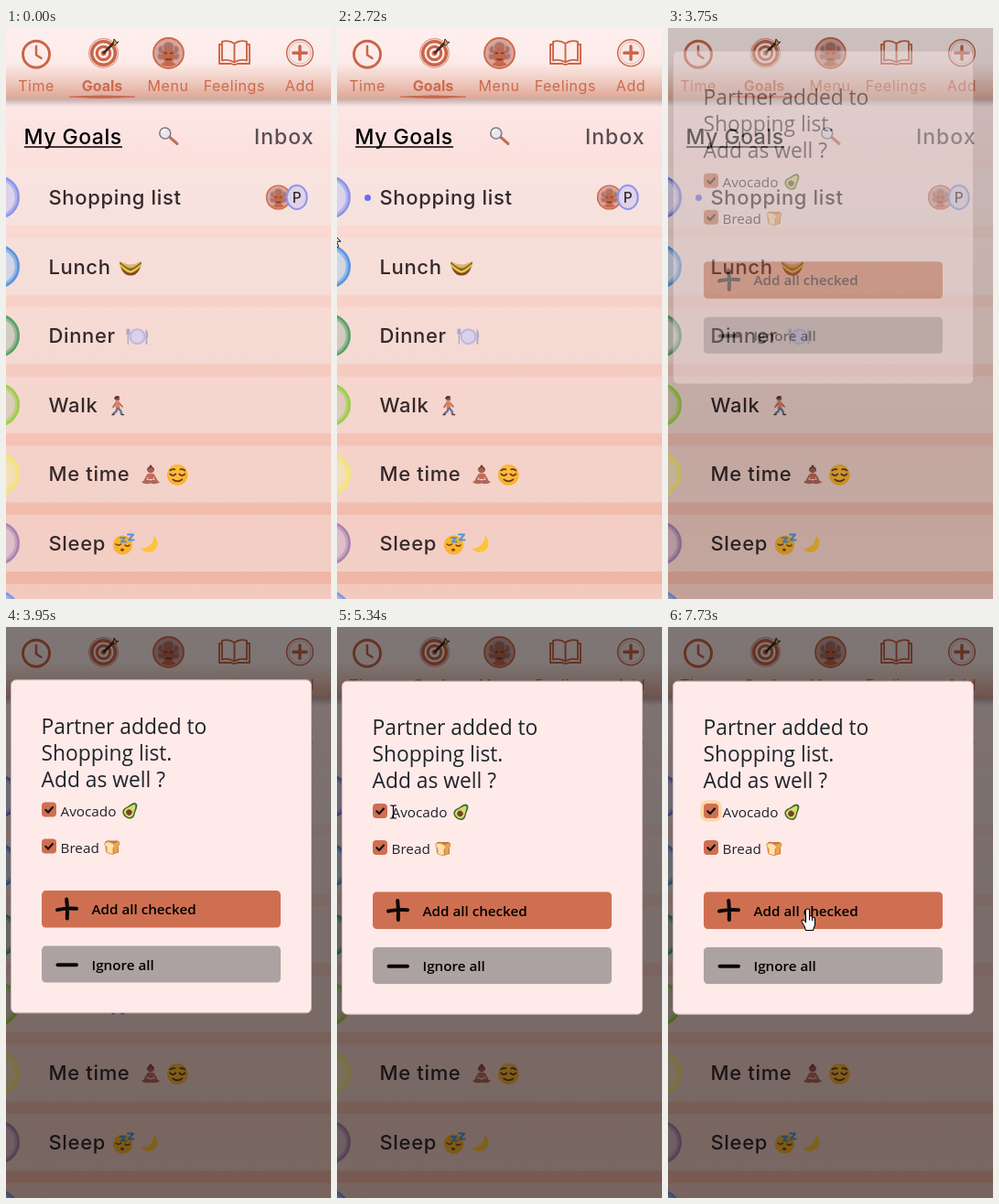
Recreate the animation shown at these times as an HTML page. Size 355x624 px, loop 8000 ms.

```html
<!DOCTYPE html>
<html lang="en">
<head>
<meta charset="utf-8">
<title>My Goals</title>
<style>
html, body { margin: 0; width: 100%; height: 100%; overflow: hidden; background: #fde8e7; }
svg { display: block; width: 100vw; height: 100vh; }
text { white-space: pre; }
.ui { font: 500 22px Inter, sans-serif; letter-spacing: .65px; fill: #33292b; }
.tab { font: 400 16px Inter, sans-serif; letter-spacing: .55px; fill: #cb6a4d; text-anchor: middle; }
.on { font-weight: 700; letter-spacing: 0; }
.head { font-size: 23px; letter-spacing: .5px; }
.inbox { letter-spacing: 1px; fill: #5a4f55; }
.title { font: 400 22.8px "Open Sans", "Noto Sans", sans-serif; fill: #212529; }
.item { font: 400 15.3px "Open Sans", "Noto Sans", sans-serif; fill: #212529; }
.btn { font: 600 15.2px "Open Sans", "Noto Sans", sans-serif; fill: #000; }
.line { fill: none; stroke-linecap: round; stroke-linejoin: round; }
</style>
</head>
<body>
<svg viewBox="0 0 355 624" xmlns="http://www.w3.org/2000/svg">
<defs>
  <linearGradient id="page" x2="0" y2="1">
    <stop offset=".13" stop-color="#fde7e6"/><stop offset=".36" stop-color="#f9d8d1"/>
    <stop offset=".72" stop-color="#f4c3b6"/><stop offset="1" stop-color="#f0b4a3"/>
  </linearGradient>
  <linearGradient id="bar" x2="0" y2="1">
    <stop offset="0" stop-color="#feefee"/><stop offset=".5" stop-color="#fcebe9"/>
    <stop offset=".76" stop-color="#eecabf"/><stop offset="1" stop-color="#dfa796"/>
  </linearGradient>
  <linearGradient id="shade" x2="0" y2="1">
    <stop stop-color="#6d5652" stop-opacity=".42"/><stop offset="1" stop-color="#6d5652" stop-opacity="0"/>
  </linearGradient>
  <linearGradient id="row" x2="0" y2="1">
    <stop stop-color="#f6ebea" stop-opacity=".36"/><stop offset="1" stop-color="#f2eae8" stop-opacity=".48"/>
  </linearGradient>

  <g id="face">
    <circle r="15.7" fill="#dfa493" stroke="#cb6a4d" stroke-width="1.8"/>
    <g fill="#b4715f" stroke="#b3a0b6" stroke-width="1.2">
      <circle cx="-7.5" cy="3" r="4"/><circle cx="7.5" cy="3" r="4"/>
      <circle cx="-6.5" cy="-3.5" r="4.5"/><circle cx="6.5" cy="-3.5" r="4.5"/><circle cy="-6" r="6"/>
    </g>
    <path d="M-8 12Q-4 8 0 9Q4 8 8 12Q0 16-8 12" fill="#c8674b"/>
    <ellipse cy="2.5" rx="6.6" ry="8" fill="#c0694c"/>
    <path class="line" d="M-4 0H-2M2 0H4M-2.5 6Q0 7.5 2.5 6" stroke="#70332a" stroke-width="1.4"/>
  </g>

  <g id="sandwich">
    <path d="M-12-6Q-5-1 0 0Q5-1 12-6Q11 4 5 8Q0 10-5 8Q-11 4-12-6" fill="#824b25"/>
    <path class="line" d="M-11-3Q-5 4 0 5Q5 4 11-3" stroke="#f7c341" stroke-width="2.4"/>
    <path class="line" d="M-11-4.5Q-5 1 0 2Q5 1 11-4.5" stroke="#657f33" stroke-width="1.8"/>
    <path d="M-12-7Q-5-3 0-3Q5-3 12-7Q6 0 0 1Q-6 0-12-7" fill="#e8b065"/>
  </g>
  <g id="plate">
    <circle r="9" fill="#c2b8dc"/><circle r="6.8" fill="#dad1ec"/>
    <path class="line" d="M-10.2-8V8M-11.4-8V-3H-9V-8" stroke="#b0a6c4" stroke-width="1.3"/>
    <path d="M9-8.5Q12-6 11.5 1H10.8V8.5H9Z" fill="#b0a6c4"/>
  </g>
  <g id="walker">
    <circle cx="-.5" cy="-8" r="2.7" fill="#9a5a43"/><path d="M-4-7.5Q-3-12 2-10L0-8Z" fill="#5a3127"/>
    <path class="line" d="M-2-3L-5 1.5M1.5-3L5 1" stroke="#a86349" stroke-width="1.6"/>
    <path d="M-2.6-5H1.8L2.5 2.5H-2.5Z" fill="#df805f"/>
    <path class="line" d="M-.5 3L-1.5 6L-4.5 8.5M1 3L3.5 6L4 9" stroke="#6c7288" stroke-width="2.3"/>
    <path class="line" d="M-6 9.7H-4M4.5 9.8H6.5" stroke="#473e44" stroke-width="1.5"/>
  </g>
  <g id="lotus">
    <path d="M-3.5-4Q-5-9 0-9Q5-9 3.5-4Z" fill="#6d3a33"/><circle cy="-9.3" r="1.5" fill="#6d3a33"/>
    <circle cy="-5" r="3" fill="#a9634c"/>
    <path class="line" d="M-3 0L-6 5M3 0L6 5" stroke="#b06b53" stroke-width="2"/>
    <path d="M-3.2-1.5H3.2L2.8 4.5H-2.8Z" fill="#c56b5d"/>
    <path d="M-10 8Q-6 3.5 0 6Q6 3.5 10 8Q5 11 0 9Q-5 11-10 8" fill="#b1675a"/>
  </g>
  <g id="calm">
    <circle r="11.3" fill="#fab32d"/><circle cx="-1" cy="-2" r="8.5" fill="#ffc445" opacity=".5"/>
    <path class="line" d="M-8-1Q-5 2.5-2-1M2-1Q5 2.5 8-1M-8-5Q-5-7-3-6M3-6Q5-7 8-5M-5 5Q0 9 5 5" stroke="#663a20" stroke-width="1.8"/>
  </g>
  <g id="asleep">
    <circle cx="-.5" cy="1" r="10.6" fill="#fab32d"/>
    <path class="line" d="M-8 0Q-5 2.5-2.5 0M2 1Q4.5 3.5 7 1" stroke="#6c3c22" stroke-width="1.4"/>
    <ellipse cx="-1" cy="6.3" rx="2" ry="1.5" fill="#7d4425"/>
    <path class="line" d="M-3-7H2L-2-2.5H3M5-10.5H11L6-4.5H11.5" stroke="#5295d4" stroke-width="2"/>
  </g>
  <path id="moon" d="M4-9A10 10 0 1 1-10 5A14 14 0 0 0 4-9" fill="#ffc338"/>
  <g id="avocado" transform="rotate(38)">
    <path d="M0-10C4-10 4-4 6 0C9 5 5 9 0 9C-5 9-9 5-6 0C-4-4-4-10 0-10" fill="#436b2b"/>
    <path d="M0-8C2-8 3-3 4.5 0C7 5 4 7.4 0 7.4C-4 7.4-7 5-4.5 0C-3-3-2-8 0-8" fill="#d5db73"/>
    <circle cy="2.5" r="3.2" fill="#784324"/>
  </g>
  <g id="bread">
    <path d="M-8-5Q-7-8-2-7L6-7Q10-5 7-1V6L0 8L-7 5Z" fill="#c47a36"/>
    <path d="M-8-5Q-4-7 1-4Q4-1 1 1V8L-6 6V0Q-9-2-8-5" fill="#ffe0b0" stroke="#dc9a52"/>
    <path d="M2-4L7-6L8-2L6 0V5L2 7Z" fill="#e9a351"/>
  </g>

  <path id="arrow" d="M0 0V15.5L3.6 12.2L6 18L8.7 16.8L6.3 11.2H11Z" fill="#fff" stroke="#000"/>
  <path id="beam" class="line" d="M-3-7H-1L0-6L1-7H3M0-6V6M-3 7H-1L0 6L1 7H3" stroke="#000" stroke-width="1.2"/>
  <g id="hand">
    <path d="M-2 2Q-2 0 0 0Q2 0 2 2V8L3 7.5Q5 7.5 5 9.5Q8 8.6 8 11V18Q7 20 6 23.5H-2Q-3 19-6 15Q-7.5 12.5-5 12Q-4 12-2 14.5Z" fill="#fff" stroke="#000" stroke-width="1.1"/>
    <path d="M2 8V12.5M5 9.5V13" stroke="#000"/>
  </g>
  <g id="tick">
    <rect x="-8" y="-8" width="16" height="16" rx="4" fill="#cf6f51"/>
    <path class="line" d="M-3.7 .2L-1 3L4-2.5" stroke="#111" stroke-width="2.2"/>
  </g>
</defs>

<rect width="355" height="624" fill="url(#page)"/>
<g id="rows"></g>

<text class="ui head" x="19.5" y="127" style="fill:#000">My Goals</text>
<path d="M20 130H127" stroke="#000" stroke-width="1.6"/>
<text class="ui head inbox" x="336.5" y="127" text-anchor="end">Inbox</text>
<path class="line" d="M179 119.5L187 126.5" stroke="#bd705a" stroke-width="3"/>
<circle cx="173.8" cy="115" r="6" fill="#e6e6ec" stroke="#857b81" stroke-width="1.6"/>
<path class="line" d="M170 114Q171 111 174 111" stroke="#fff" stroke-width="1.4"/>

<use href="#face" transform="translate(297.5 185) scale(.82)"/>
<ellipse cx="317.7" cy="185" rx="11" ry="13" fill="#ded3e9" stroke="#8d95e9" stroke-width="2"/>
<text x="317.7" y="190.6" text-anchor="middle" style="font:500 15.5px Inter,sans-serif;fill:#33292b">P</text>
<circle id="dot" cx="33.5" cy="185.5" r="3.5" fill="#6b6cf2"/>

<rect y="77" width="355" height="9" fill="url(#shade)"/>
<rect width="355" height="77" fill="url(#bar)"/>
<g class="line" stroke="#cb6547">
  <circle cx="33" cy="28.8" r="14.5" stroke-width="2.9"/>
  <path d="M33 20V29.5L38.5 33" stroke-width="2.5"/>
  <circle cx="106.5" cy="27.5" r="15.8" stroke="#d99a87" stroke-width="1.2"/>
  <circle cx="106.5" cy="27.5" r="12.8" stroke-width="3.6"/>
  <circle cx="106.5" cy="27.5" r="7.2" stroke-width="3.2"/>
  <circle cx="106.5" cy="27.5" r="2.5" fill="#cb6547"/>
  <path d="M107 27L119 15" stroke="#352a26" stroke-width="2.6"/>
  <path d="M117 17L118 12L121 16L123 15L119 19Z" fill="#d6a84b" stroke="#352a26"/>
  <path d="M249.5 17V37.5M249.5 17Q243 12.5 236 15V35.5Q243 33.5 249.5 37.5Q256 33.5 263 35.5V15Q256 12.5 249.5 17M235.5 18H233V39H246Q249.5 41 253 39H266V18H263.5" stroke-width="1.9"/>
  <circle cx="321" cy="27.2" r="14.4" fill="#f8e6e6" stroke-width="1.4"/>
  <circle cx="321" cy="27.2" r="12" stroke="#e3b9b0" stroke-width="1"/>
  <path d="M321 20V34.4M313.8 27.2H328.2" stroke-width="3.4"/>
</g>
<use href="#face" transform="translate(177.5 27.5) scale(1.05)"/>
<g id="tabs"></g>
<path d="M69 75.2Q105 72.6 141 75.2Q105 78 69 75.2" fill="#cb6547" stroke="#cb6547" stroke-width=".8"/>

<rect id="veil" width="355" height="624"/>
<g id="dialog">
  <rect x="5.5" y="59.2" width="328" height="364" rx="5.5" fill="#ffeaea" stroke="#c9b4b3"/>
  <text class="title" x="38.5" y="118">Partner added to</text>
  <text class="title" x="38.5" y="147">Shopping list.</text>
  <text class="title" x="38.5" y="176">Add as well ?</text>
  <rect id="ring" x="37" y="191" width="20" height="20" rx="6" fill="#ffd7a8" stroke="#ffd7a8" stroke-width="3.5"/>
  <use href="#tick" x="47" y="201"/>
  <use href="#tick" x="47" y="241"/>
  <text class="item" x="59.5" y="208">Avocado</text>
  <text class="item" x="59.5" y="248">Bread</text>
  <use href="#avocado" x="0" y="0" transform="translate(136 202)"/>
  <use href="#bread" transform="translate(116 242)"/>
  <rect x="39" y="289.5" width="261" height="40.5" rx="4.5" fill="#cf6f51"/>
  <rect x="39" y="350" width="261" height="40" rx="4.5" fill="#aca2a1"/>
  <path class="line" d="M56 310.5Q66 308.5 77 309.2M66.2 299Q67.5 309 66.8 320" stroke="#0b0808" stroke-width="4"/>
  <path class="line" d="M56.5 370.7H77" stroke="#0b0808" stroke-width="4"/>
  <text class="btn" x="93.5" y="315.6">Add all checked</text>
  <text class="btn" x="93.5" y="376.4">Ignore all</text>
</g>
<use id="cursor"/>
</svg>
<script>
const $ = id => document.getElementById(id);
const PITCH = 75.6;

// label, ring colour, fill colour, then pairs of icon and x
const rows = [
  ["Shopping list", "#8b95eb", "#dcd2ea"],
  ["Lunch", "#5795e3", "#d1d5e4", "sandwich", 136],
  ["Dinner", "#58a168", "#d2cbc0", "plate", 143.5],
  ["Walk", "#9bd044", "#ddccb9", "walker", 122],
  ["Me time", "#f3e673", "#f4dfb9", "lotus", 158, "calm", 187.3],
  ["Sleep", "#aa83b0", "#dfbfc7", "asleep", 128, "moon", 157.5],
  ["", "#7798e6", "#d0c4d8"]
];
$("rows").innerHTML = rows.map(([label, ring, fill, ...icons], i) => {
  const y = i * PITCH, mid = 185 + y;
  let s = `<rect y="${154 + y}" width="355" height="62" fill="url(#row)"/>
    <circle cx="-9" cy="${mid}" r="22.6" fill="${fill}" stroke="${ring}" stroke-width="2.8"/>
    <circle cx="-9" cy="${mid}" r="20" fill="none" stroke="${ring}" stroke-opacity=".5" stroke-width="2.6"/>
    <text class="ui" x="46.5" y="${193 + y}">${label}</text>`;
  for (let k = 0; k < icons.length; k += 2)
    s += `<use href="#${icons[k]}" x="${icons[k + 1]}" y="${mid + 1}"/>`;
  return s;
}).join("");

$("tabs").innerHTML = [["Time", 33], ["Goals", 105], ["Menu", 177], ["Feelings", 249.3], ["Add", 321]]
  .map(([s, x]) => `<text class="tab${s === "Goals" ? " on" : ""}" x="${x}" y="69">${s}</text>`).join("");

const firstRing = document.querySelector("#rows circle");

// start time, cursor, x, y
const steps = [
  [0], [500],
  [2720, "arrow", -7, 222], [2920, "arrow", -9, 206], [3130], [3340], [3550],
  [3750], [3950], [4150],
  [4350, "arrow", 6, 186], [4540, "arrow", 60, 184], [4740, "arrow", 112, 188],
  [4940, "arrow", 129, 197], [5150, "beam", 100, 201], [5340, "beam", 61.5, 202],
  [5540, "hand", 50, 194], [5740, "hand", 48, 194], [5940, "hand", 47, 194], [6140, "hand", 48, 194],
  [6340, "hand", 52, 186], [6540, "arrow", 64, 171], [6740, "arrow", 78, 192],
  [6940, "arrow", 92, 235], [7140, "arrow", 101, 278], [7340, "hand", 104, 298],
  [7530, "hand", 135, 303], [7730, "hand", 152.5, 308]
];

const show = (el, on) => el.setAttribute("visibility", on ? "visible" : "hidden");

function draw(t) {
  const [at, kind, x, y] = steps.findLast(s => s[0] <= t);
  const fade = at < 3750 ? 0 : at < 3950 ? .4 : 1;
  const lift = at < 3950 ? -34.2 : at < 4150 ? -1.4 : 0;
  show($("dot"), at >= 500);
  show($("ring"), at >= 5740);
  firstRing.setAttribute("stroke", at >= 3340 ? "#777de6" : rows[0][1]);
  $("veil").setAttribute("opacity", fade / 2);
  $("dialog").setAttribute("opacity", fade);
  $("dialog").setAttribute("transform", `translate(0 ${lift})`);
  show($("cursor"), !!kind);
  if (kind) {
    $("cursor").setAttribute("href", "#" + kind);
    $("cursor").setAttribute("transform", `translate(${x} ${y})`);
  }
}

const start = performance.now();
function loop() {
  draw((performance.now() - start) % 8000);
  requestAnimationFrame(loop);
}
draw(0);
requestAnimationFrame(loop);
</script>
</body>
</html>
```
